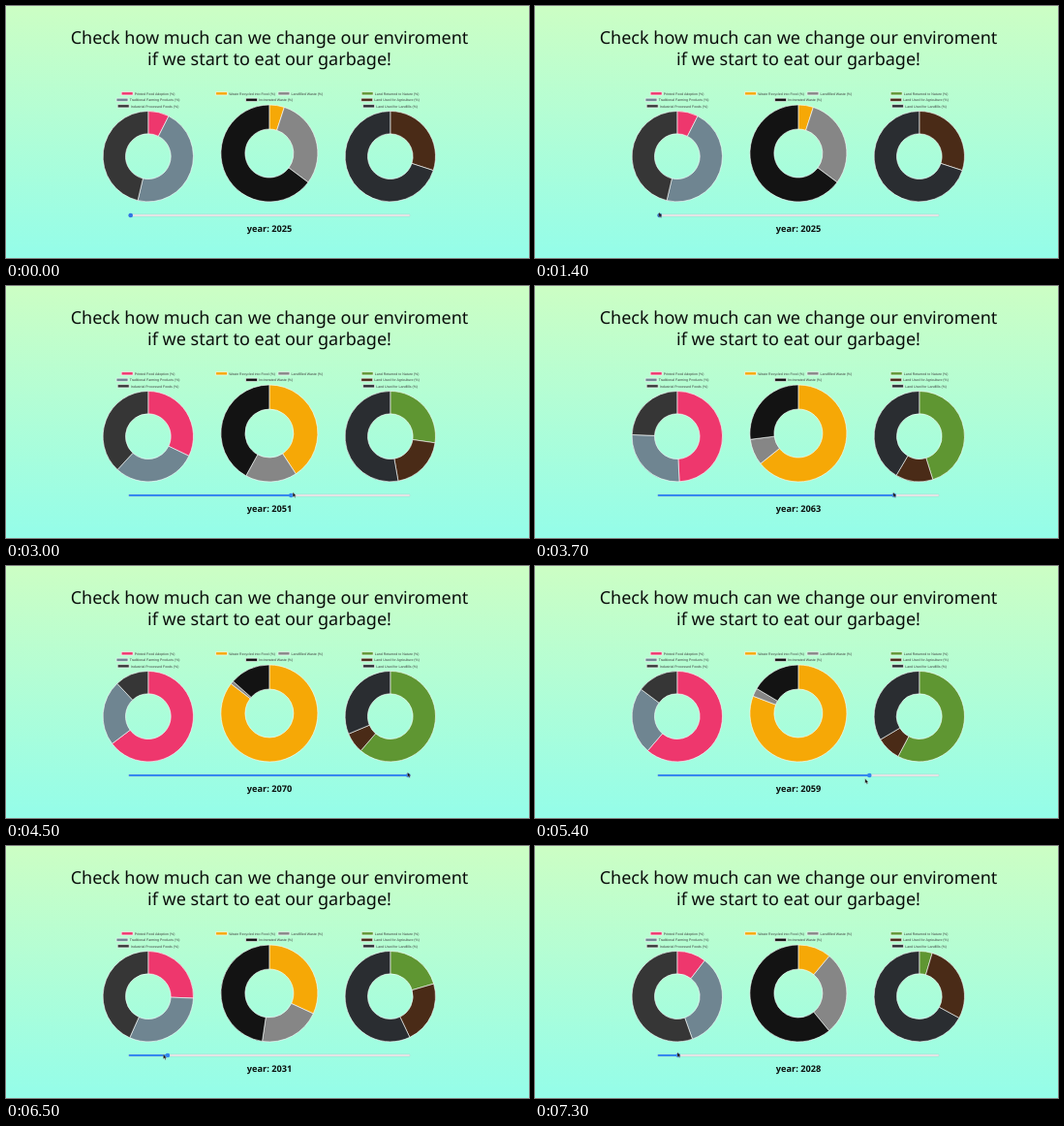
An HTML page for the animation above (7400 ms loop, 540 by 260 pixels).

```html
<!DOCTYPE html>
<html lang="en">
<head>
<meta charset="utf-8">
<title>Garbage charts</title>
<style>
  html, body { margin: 0; width: 100%; height: 100%; overflow: hidden; }
  body { background: linear-gradient(#ccfec4, #94fde9); }
  svg { display: block; width: 540px; height: 260px; text-rendering: geometricPrecision; }
  .head { font: 500 18px "Noto Sans", "Open Sans", sans-serif; text-anchor: middle; fill: #0b0f0c; }
  .year { font-size: 9.2px; font-weight: 600; }
  .legend { font: 3.56px "Liberation Sans", Arial, sans-serif; fill: #3c3c3c; }
  .edge { stroke: #fff; stroke-width: .6; stroke-linejoin: round; }
</style>
</head>
<body>
<svg viewBox="0 0 540 260">
  <text class="head" x="272" y="39">Check how much can we change our enviroment</text>
  <text class="head" x="272" y="61">if we start to eat our garbage!</text>
  <g id="charts"></g>
  <rect x="126.6" y="215" width="290.6" height="2" rx="1" fill="#efefef" stroke="#b9b9bd" stroke-width=".4"/>
  <rect id="fill" x="126.6" y="215" height="2" rx="1" fill="#3488f0"/>
  <circle id="thumb" cy="216" r="2.3"/>
  <text id="year" class="head year" x="272" y="233"></text>
  <path id="cursor" d="M0 0V5L1.2 4L2 5.8L2.8 5.5L2 3.8H3.5Z" fill="#111" stroke="#fff" stroke-width=".25"/>
</svg>
<script>
const LOOP = 7400, STEP = 100, FIRST_YEAR = 2025;
const ARRIVE = 1250, GRAB = 1700, RETURN = 4970, RELEASE = 6620;
const $ = id => document.getElementById(id);
const clamp = v => Math.min(1, Math.max(0, v));
const progress = (time, from, to) => clamp((time - from) / (to - from));

// Legend rows of [label, colour]; shares give percent as base + rate * years, the last slice takes the rest.
// The first ring opens with other shares, which fade out once the slider moves.
const charts = [
  { x: 146.8, y: 155.2, r: 46.7, shares: [[6, 1.35], [35, -.27]], opening: [1.5, 11.2], rows: [
    [["Printed Food Adoption (%)", "#ee376d"]],
    [["Traditional Farming Products (%)", "#6f8591"]],
    [["Industrial Processed Foods (%)", "#363636"]]] },
  { x: 271.9, y: 152, r: 50, shares: [[5, 1.85], [30.2, -.67]], opening: [0, 0], rows: [
    [["Waste Recycled into Food (%)", "#f6a806"], ["Landfilled Waste (%)", "#868686"]],
    [["Incinerated Waste (%)", "#131313"]]] },
  { x: 396.8, y: 155.2, r: 46.7, shares: [[0, 1.41], [30, -.52]], opening: [0, 0], rows: [
    [["Land Returned to Nature (%)", "#5f9632"]],
    [["Land Used for Agriculture (%)", "#4a2b17"]],
    [["Land Used for Landfills (%)", "#2a2d31"]]] }
];

// Years passed on the slider: up to the end, a pause, then back
function dragged(time) {
  const up = 26 * progress(time, GRAB, 3000) + 19 * progress(time, 3000, 4150);
  return up - 42 * progress(time, RETURN, RELEASE);
}

// The rings trail the slider: a mean over the last second, recent moments weighing most
function trailing(value, time) {
  const count = 40;
  let sum = 0;
  for (let i = 0; i < count; i++) {
    sum += value(time - 1000 * (1 - Math.sqrt(1 - (i + .5) / count)));
  }
  return sum / count;
}

function add(tag, attrs, text = "") {
  const node = document.createElementNS("http://www.w3.org/2000/svg", tag);
  for (const name in attrs) node.setAttribute(name, attrs[name]);
  node.textContent = text;
  return $("charts").appendChild(node);
}

function addLegendRow(items, center, y) {
  const swatch = 11.9, indent = 13.6, gap = 3;
  const texts = items.map(([label]) => add("text", { y: y + 1.25, class: "legend" }, label));
  const widths = texts.map(text => indent + text.getComputedTextLength());
  let x = center - (widths.reduce((a, b) => a + b) + gap * (items.length - 1)) / 2;
  items.forEach(([, fill], i) => {
    add("rect", { x, y: y - 1.6, width: swatch, height: 3.2, fill, class: "edge" });
    texts[i].setAttribute("x", x + indent);
    x += widths[i] + gap;
  });
}

function slicePath({ x, y, r }, from, to) {
  const point = (share, radius) => {
    const angle = share / 50 * Math.PI;
    return `${(x + radius * Math.sin(angle)).toFixed(2)} ${(y - radius * Math.cos(angle)).toFixed(2)}`;
  };
  const inner = r / 2, large = to - from > 50 ? 1 : 0;
  return `M${point(from, r)}A${r} ${r} 0 ${large} 1 ${point(to, r)}` +
    `L${point(to, inner)}A${inner} ${inner} 0 ${large} 0 ${point(from, inner)}Z`;
}

for (const chart of charts) {
  chart.rows.forEach((row, i) => addLegendRow(row, chart.x, 90.3 + i * 6.5));
  chart.slices = chart.rows.flat().map(([, fill]) => add("path", { fill, class: "edge" }));
}

function drawRings(time) {
  const years = trailing(dragged, time);
  const opening = trailing(t => t < GRAB ? 1 : 0, time);
  for (const chart of charts) {
    let end = 0;
    chart.slices.forEach((slice, i) => {
      const from = end, share = chart.shares[i];
      end = share ? from + share[0] + share[1] * years + chart.opening[i] * opening : 100;
      slice.setAttribute("d", slicePath(chart, from, end));
    });
  }
}

function draw(time) {
  const thumbX = years => 128.7 + years * 6.37;
  const years = Math.round(dragged(time));
  drawRings(time);

  $("fill").setAttribute("width", thumbX(years) - 126.6);
  $("thumb").setAttribute("cx", thumbX(years));
  $("thumb").setAttribute("fill", time < ARRIVE ? "#2f74e4" : time < GRAB ? "#1d58b8" : "#3286ee");
  $("year").textContent = `year: ${FIRST_YEAR + years}`;

  // The pointer comes in from the right, leads the thumb a little and sags on the way back
  const away = (1 + Math.cos(Math.PI * progress(time, 0, ARRIVE))) / 2;
  const sag = Math.sin(Math.PI * progress(time, RETURN, RELEASE));
  const x = thumbX(dragged(time + 25)) - .8 + 415 * away;
  const y = 212.8 + 30 * away + 9 * sag;
  $("cursor").setAttribute("transform", `translate(${x} ${y})`);
}

const start = performance.now();
function tick() {
  const time = (performance.now() - start) % LOOP;
  draw(Math.floor(time / STEP) * STEP);
  requestAnimationFrame(tick);
}
tick();
</script>
</body>
</html>
```
